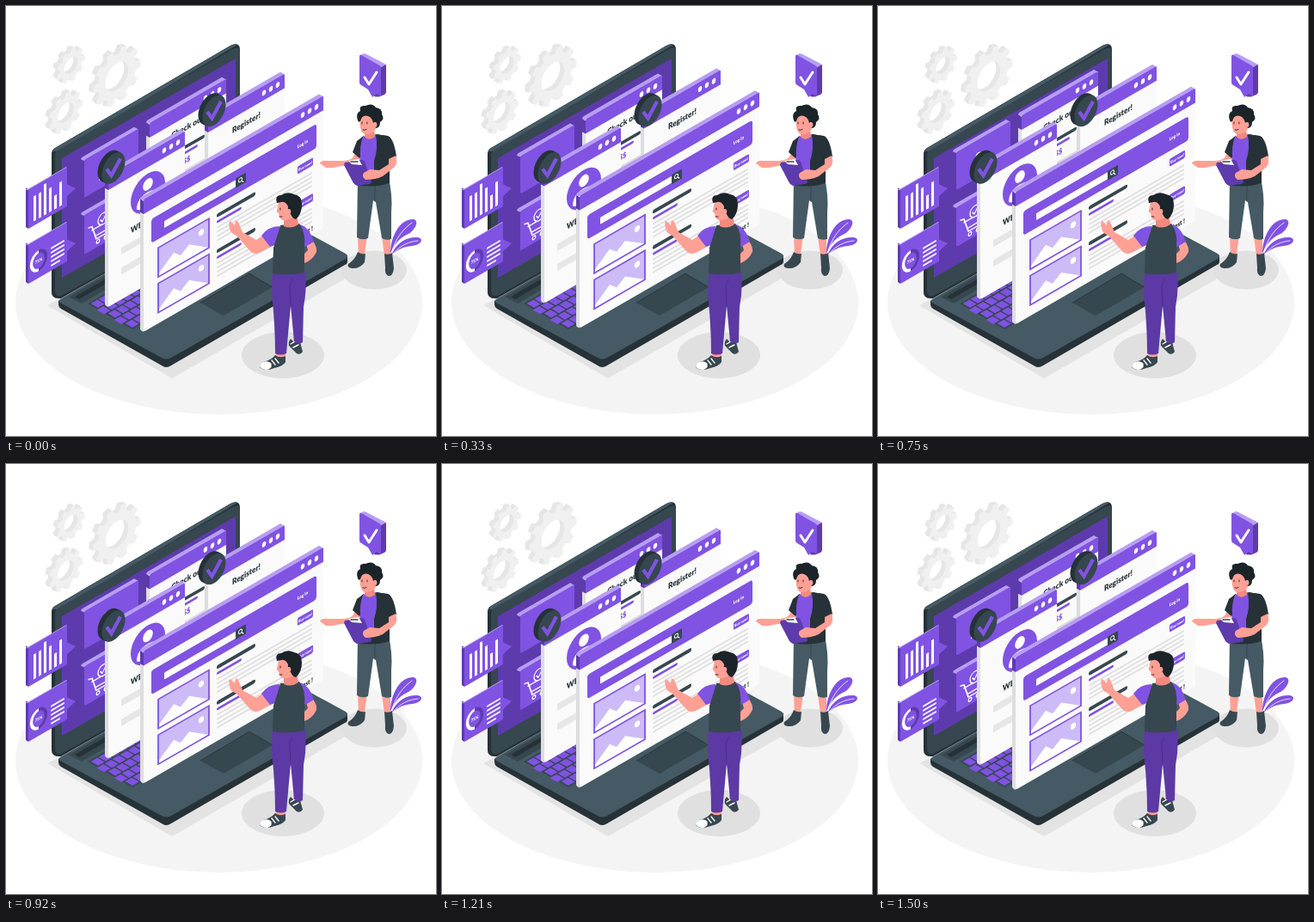
These frames come from a looping animation (500x500 px, 1.54 s). An HTML page:

```html
<!DOCTYPE html>
<html lang="en">
<head>
<meta charset="utf-8">
<title>Floating windows</title>
<style>
  html, body { margin: 0; height: 100%; overflow: hidden; background: #fff; }
  svg { display: block; width: 100vw; height: 100vh; }
  text { font-family: Lato, "Open Sans", sans-serif; font-weight: 900; }
</style>
</head>
<body>
<svg id="stage" viewBox="0 0 500 500"></svg>
<script>
const violet = '#8053e3', deep = '#5e3bad', pale = '#b79ef3';
const ink = '#263238', slate = '#37474f', steel = '#455a64';
const skin = '#ffa095', skinShade = '#f28a80', hair = '#1b2429';
const LOOP = 1540, RISE = 9;

const path = (d, fill, extra = '') => `<path d="${d}" fill="${fill}" ${extra}/>`;
const line = (d, color, width = 1, extra = '') =>
  path(d, 'none', `stroke="${color}" stroke-width="${width}" stroke-linecap="round" stroke-linejoin="round" ${extra}`);
const rect = (x, y, w, h, fill, r = 0, extra = '') =>
  `<rect x="${x}" y="${y}" width="${w}" height="${h}" rx="${r}" fill="${fill}" ${extra}/>`;
const oval = (x, y, rx, ry, fill, extra = '') =>
  `<ellipse cx="${x}" cy="${y}" rx="${rx}" ry="${ry}" fill="${fill}" ${extra}/>`;
// Wall plane of the isometric view, rising to the right.
const wall = (x, y, body) => `<g transform="matrix(1 -.577 0 1 ${x} ${y})">${body}</g>`;
const label = (x, y, size, fill, str, anchor = 'middle') =>
  `<text transform="translate(${x} ${y}) scale(.866 1)" font-size="${size}" fill="${fill}" text-anchor="${anchor}">${str}</text>`;
const repeat = (n, fn) => Array.from({ length: n }, (_, i) => fn(i)).join('');

function slab(x, y, w, h, front, side, top, body) {
  return wall(x, y,
    path(`M1 0L-4 -3.6V${h - 6}Q-4 ${h - 4} 0 ${h}Z`, side) +
    path(`M0 1L-4 -3Q-3.5 -4.6 -2 -4.6H${w - 5}L${w} 1Z`, top) +
    rect(0, 0, w, h, front, 2) + body);
}

function browser(x, y, w, h, body) {
  return slab(x, y, w, h, '#fafafa', '#dddde0', pale,
    path('M0 2L-4 -3V12.5L0 17Z', deep) +
    path(`M0 17V2Q0 0 2 0H${w - 2}Q${w} 0 ${w} 2V17Z`, violet) +
    repeat(3, i => oval(w - 24 + i * 8, 8.5, 2.3, 3.1, '#fff')) + body);
}

function gear(x, y, r, teeth) {
  const step = Math.PI * 2 / teeth;
  const at = (radius, a) => `${(radius * Math.cos(a)).toFixed(1)} ${(radius * Math.sin(a)).toFixed(1)}`;
  const rim = repeat(teeth, i => [[.8, -.32], [1, -.2], [1, .2], [.8, .32]]
    .map(([k, s]) => 'L' + at(r * k, (i + s) * step)).join(''));
  const hole = r * .48;
  const d = `M${rim.slice(1)}ZM${hole} 0A${hole} ${hole} 0 1 0 ${-hole} 0A${hole} ${hole} 0 1 0 ${hole} 0Z`;
  const face = (dx, dy, fill) =>
    `<g transform="matrix(.866 -.5 0 1 ${x + dx} ${y + dy})">${path(d, fill, 'fill-rule="evenodd"')}</g>`;
  return repeat(4, i => face(i - 5, i * .5 - 2.5, '#e6e6e6')) + face(0, 0, '#f0f0f0');
}

function badge(x, y) {
  const disc = (dx, dy, fill) => wall(x + dx, y + dy, oval(0, 0, 13.5, 16.6, fill));
  return repeat(5, i => disc(i - 5, i * .5 - 2.5, ink)) + disc(0, 0, slate) +
    line(`M${x - 8} ${y + 1}l5.500 7.500L${x + 8} ${y - 11}`, violet, 4.2, 'style="stroke-linecap:butt;stroke-linejoin:miter"');
}

const gears = () => gear(129, 82, 32, 10) + gear(69.5, 124, 22.5, 9) + gear(75.5, 69, 19, 9);

function floor() {
  return oval(247.5, 345, 236.5, 130, '#f4f4f4') +
    path('M48 348L193 433L410 308L290 225Z', '#e3e3e3') +
    oval(322, 406, 48, 27, '#e0e0e0') + oval(428, 307, 38, 22.5, '#e0e0e0');
}

function laptop() {
  const keys = repeat(5, row => repeat(14, i =>
    rect(row * 10 + .8, i * 9 - (row % 2) * 3 + .8, 8.4, 7.6, violet)));
  return path('M61 343L272 221L397 290V297Q397 300 394 301L192 418Q186 422 181 418L64 352Q61 350 61 347Z', ink) +
    path('M63 341L272 221L395 288Q399 291 395 294L192 409Q186 412 181 409L63 345Q60 343 63 341Z', steel) +
    path('M53 172Q53 167 57 165L261 46Q272 41 272 51V222L64 340Q53 341 53 333Z', ink) +
    path('M54 169Q54 167 57 165L261 46Q266 43 269 45L62 169Z', steel) +
    path('M57 174Q57 170 60 168L264 50Q272 46 272 54V222L64 337Q57 338 57 331Z', slate) +
    path('M65 177L267 61V200L65 316Z', deep) +
    path('M73 338L270 224L285 232L88 346Z', slate) +
    path('M80 338L270 228L275 231L85 341Z', ink) +
    `<g transform="matrix(.5 .289 .5 -.289 97 346)">${rect(-2, -2, 104, 270, slate)}` +
    `<g transform="scale(2)">${keys}</g></g>` +
    path('M226 345L283 311L310 327L253 360Z', slate) +
    line('M226 345L283 311L310 327', ink, .8);
}

function screenPanels() {
  const cart = line('M5 18l4 1l5 17h13M9 23h19l-3 9h-11', '#fff', 1.5) +
    oval(16, 40, 1.8, 2, 'none', 'stroke="#fff" stroke-width="1.3"') +
    oval(25, 40, 1.8, 2, 'none', 'stroke="#fff" stroke-width="1.3"') +
    oval(22, 17, 6, 6.5, violet, 'stroke="#fff" stroke-width="1.3"') +
    line('M19 17l2 3l4-6', '#fff', 1.3);
  const user = oval(26, 19, 3.5, 4, '#fff') + path('M17 34q0-9 9-9t9 9z', '#fff');
  return slab(91, 179, 63, 44, violet, deep, pale, user) +
    slab(91, 243, 63, 46, violet, deep, pale, cart);
}

function checkoutWindow() {
  return browser(167, 136, 89, 150,
    label(44, 33, 9.5, ink, 'Check out') +
    rect(28, 50, 36, 4, slate, 2) + rect(28, 57, 28, 3, violet, 1.5) +
    label(43, 71, 8.5, violet, '$$') +
    repeat(3, i => rect(28, 78 + i * 6, 50, 2.5, '#dcdcdc', 1)));
}

const registerWindow = () => browser(235, 130, 89, 140, label(44.5, 34.5, 9.5, ink, 'Register!'));

function welcomeWindow() {
  return browser(119, 197, 89, 153,
    oval(46, 46.5, 20, 22, violet) + oval(46, 37, 5.8, 6.6, '#fff') +
    path('M33 59Q33 46 46 46T59 59Q46 69 33 59Z', '#fff') +
    label(26, 82.5, 9.5, ink, 'WELCOME', 'start') +
    rect(15, 93, 59, 8, '#e6e6e6', 1) + rect(15, 116, 59, 8, '#e6e6e6', 1));
}

function shopWindow() {
  const thumb = y => rect(17, y, 59, 34, '#cdbbf7', 0) +
    path(`M18 ${y + 33}V${y + 30}L35 ${y + 16}L43 ${y + 24}L53 ${y + 17}L75 ${y + 33}Z`, '#fff') +
    oval(67, y + 11, 3.2, 3.6, '#fff') +
    rect(17, y, 59, 34, 'none', 0, `stroke="${violet}" stroke-width="1.8"`);
  const product = y => rect(85, y, 45, 4.4, slate, 2) + rect(85, y + 8, 29, 3, violet, 1.5) +
    repeat(4, i => rect(85, y + 15 + i * 5, 111, 2, '#dfdfdf', 1)) +
    rect(179, y - 1, 18, 9, violet, 1.5) + label(188, y + 5.2, 4.4, '#fff', 'Buy now!');
  return browser(160, 225, 209, 154,
    rect(9, 28, 192, 28, violet, 3) +
    rect(24, 39, 84, 8, '#fff', 1) + rect(107, 37.5, 12, 11, slate, 1) +
    oval(112.5, 42.3, 2, 2.3, 'none', 'stroke="#fff"') + line('M114 44.2l2 2.3', '#fff') +
    label(185, 44, 5.4, '#fff', 'Log in') +
    thumb(66) + thumb(107.5) + product(66) + product(107.5) +
    rect(150, 142, 48, 11, '#fafafa') + label(197, 149.5, 7.5, ink, 'Best !', 'end'));
}

function chartPanels() {
  const panel = (y, body) =>
    path(`M68 ${y - 7}L81 ${y - 1}L69 ${y + 10}Z`, violet) +
    path(`M26 ${y}L23 ${y - 1.5}V${y + 44}L26 ${y + 46}Z`, deep) +
    wall(26, y, rect(0, 0, 45, 46, violet, 1) + line('M-2.5 -1.2L-1 0H44', pale, 1) + body);
  const heights = [29, 29, 36, 28, 16, 28];
  const bars = heights.map((h, i) => rect(6 + i * 6, 41 - h, 3, h, '#fff')).join('');
  const donut = oval(12, 26, 8.5, 10.5, 'none', `stroke="${deep}" stroke-width="3.4"`) +
    line('M12 36.500A8.5 10.5 0 0 1 12 15.500', '#fff', 3.4, 'style="stroke-linecap:butt"') +
    label(12, 27.8, 5, '#fff', '75%') +
    repeat(5, i => rect(26, 20 + i * 5 - 1, i === 4 ? 11 : 16, 2, '#fff', 1));
  return panel(213, bars) + panel(277, donut);
}

function bubble() {
  return path('M411 58L415 55.500Q416 55 418 55.500L440 67Q442 68 442 70L436 74Z', pale) +
    path('M435 72L442 68V100Q442 102 440 103L434 105.500L429 105.500L424 100Z', deep) +
    path('M411 59Q411 56 413 57L434 69Q436 70 436 72V103Q436 105 434 104L431 102L426 106L421 97L413 92Q411 91 411 89Z', violet) +
    line('M417 83l5 8L431 77', '#fff', 3);
}

function plant() {
  return path('M447 288C447 268 458 247 474 248C482 250 474 263 466 266C457 270 451 278 447 288Z', violet) +
    path('M448 290C454 274 467 268 479 269C487 271 482 278 472 279C461 280 454 284 448 290Z', violet) +
    line('M448 288C453 270 461 260 472 252M449 289C459 278 468 274 479 273', '#fff', .8);
}

function woman() {
  return path('M409 267H420L417 288L410 292ZM437 268H447L447 290H440Z', skin) +
    path('M409 286Q413 289 418 288L417 298Q411 306 402 305Q396 304 398 300Q406 295 409 286Z', slate) +
    path('M440 288Q445 290 449 287L451 305Q450 314 445 314Q440 312 441 304Z', slate) +
    path('M409 200L444 196Q450 220 448 240L448 271Q442 273 437 270L430 228L427 226L421 270Q414 273 408 269Z', steel) +
    line('M429 205L429 227', slate, 1) +
    path('M409 163L404 175Q402 179 393 180L375 180Q366 179 365 183L372 188Q378 189 385 187L403 184Q409 182 413 175Z', skin) +
    path('M416 151L408 157L403 170L411 177L416 170Z', ink) +
    path('M414 152L432 149L446 152Q452 160 446 176L446 206Q428 212 409 208L411 185Z', ink) +
    path('M415 152L430 150Q433 166 428 180L428 200H411L412 176Q411 163 415 152Z', violet) +
    path('M438 150L444 151Q451 154 454 175L445 180L440 168Z', ink) +
    path('M417 146L428 143L429 152Q422 158 417 152Z', skinShade) +
    path('M412 128Q421 122 430 131L430 143Q425 150 417 149Q410 146 412 128Z', skin) +
    path('M409 133Q406 125 412 122Q410 115 418 116Q426 112 430 118Q438 119 437 126Q441 131 435 135Q435 142 430 142L427 136Q426 130 421 128Q414 126 412 134Q410 136 409 133Z', hair) +
    oval(429, 138, 2.4, 3, skin) +
    line('M414 135v2M420 135v2M415 144q2 1 4-.5', hair, .9) +
    path('M394 182L414 179Q416 179 417 181L425 204Q425 207 422 207L408 209Q406 208 404 206L393 185Z', deep) +
    path('M398 180L410 178L414 185L402 184Z', '#fff') + line('M401 181l8 0', slate, 1.5) +
    path('M445 178L453 174Q456 182 452 187L438 198Q430 202 418 202Q413 198 416 194L423 190L434 191L445 184Z', skin);
}

function man() {
  return path('M334 385H344L342 394L335 395Z', skin) +
    path('M331 387L335 391L342 391L345 402Q342 406 338 404L329 395Q328 390 331 387Z', slate) +
    line('M331 393l5-3M334 397l6-3', '#fff', 1.4) +
    path('M315 400H325L325 411L313 410Z', skin) +
    path('M313 406Q318 410 325 407L325 414Q322 419 312 421Q302 425 296 421Q293 418 299 414Q308 412 313 406Z', slate) +
    path('M299 414Q304 412 308 415Q311 420 304 423Q297 423 295 419Q295 416 299 414Z', '#fff') +
    line('M309 412l4 5M313 410l4 5', '#fff', 1.4) +
    path('M310 307L348 308Q350 330 346 350L345 391Q340 394 335 390L331 348L326 404Q319 407 313 404Q313 370 309 335Z', '#5c39a4') +
    line('M331 350L330 325L333 318', '#4b2d92', 1) +
    path('M300 266L291 272L275 263L270 251L267 249L266 255L261 250Q258 251 260 258Q260 264 268 267L283 284Q288 290 295 287L310 279Z', skin) +
    path('M348 273L356 272Q362 280 361 286Q356 296 347 299L344 291L351 284Z', skin) +
    path('M318 256Q305 256 297 267L307 280L319 276Z', violet) +
    path('M341 254Q352 256 358 274L348 280L341 272Z', violet) +
    path('M319 255L341 253Q349 264 347 280V310Q330 314 310 311L311 281Q316 266 319 255Z', slate) +
    path('M323 244L338 242L340 254Q331 260 323 256Z', skinShade) +
    path('M317 227L335 225L336 243Q331 250 322 249Q318 248 317 241L314.500 239Q316 235 317 227Z', skin) +
    path('M315 229Q312 220 320 220Q327 215 335 219Q344 220 344 231Q344 242 337 248Q333 247 331 242Q327 239 328 233Q325 227 320 228Z', hair) +
    oval(329, 239, 2.3, 3.1, skin) +
    line('M319 235v2M318 245h3', hair, .9);
}

document.getElementById('stage').innerHTML =
  floor() + gears() + laptop() +
  `<g id="floating">${screenPanels()}${checkoutWindow()}${registerWindow()}${welcomeWindow()}${shopWindow()}</g>` +
  badge(125, 188.5) + badge(242, 122) + chartPanels() +
  bubble() + plant() + woman() + man();

const floating = document.getElementById('floating');
const start = performance.now();

function draw() {
  const t = (performance.now() - start) % LOOP;
  const lift = RISE / 2 * (1 - Math.cos(2 * Math.PI * (t + 50) / LOOP));
  floating.setAttribute('transform', `translate(0 ${-lift.toFixed(2)})`);
  requestAnimationFrame(draw);
}
draw();
</script>
</body>
</html>
```
